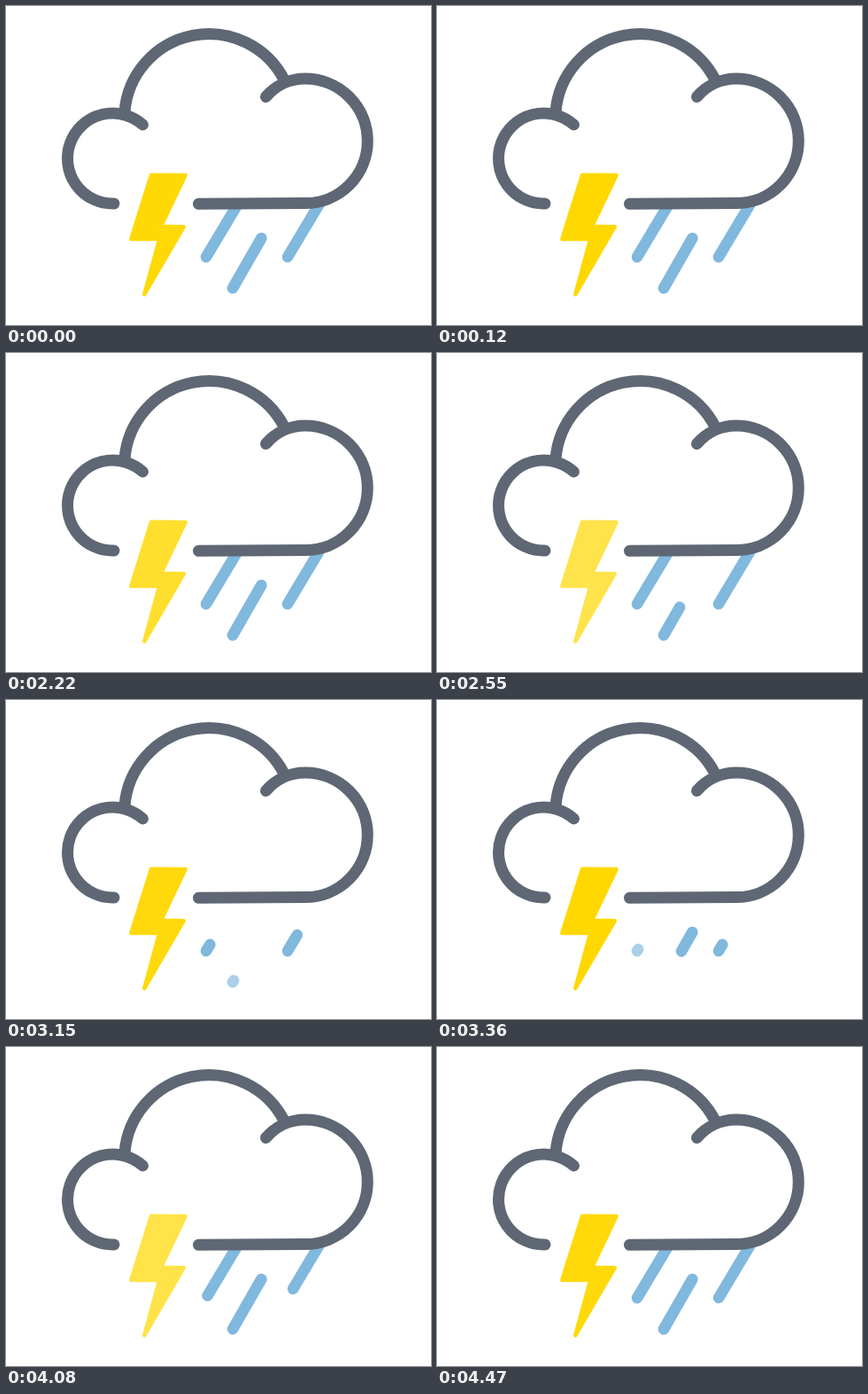
Write an HTML page that moves like this. It is 480x360 px and loops after 4500 ms.

```html
<!DOCTYPE html>
<html lang="en">
<head>
<meta charset="utf-8">
<title>Thunderstorm</title>
<style>
  html, body { margin: 0; width: 100%; height: 100%; overflow: hidden; background: #fff; }
  svg { display: block; width: 100vw; height: 100vh; }
  path { stroke-linecap: round; stroke-linejoin: round; }
  .cloud { fill: none; stroke: #5e6773; stroke-width: 13; }
  #rain { stroke: #80b8de; stroke-width: 12.6; }
  #bolt { fill: #ffd800; stroke: #ffd800; stroke-width: 4.5; }
</style>
</head>
<body>
<svg viewBox="0 0 480 360">
  <g id="rain"></g>
  <path class="cloud" d="M122 223A51 51 0 1 1 154.5 134"/>
  <path class="cloud" style="stroke-linecap:butt" d="M134 120A95.5 95.5 0 0 1 314.5 84"/>
  <path class="cloud" d="M293.5 102.5A58.5 58.5 0 0 1 338 82A70.3 70.3 0 0 1 338 222.6L217.5 223.3"/>
  <path id="bolt" d="M164 190.8L202.6 191L175 248.8L200.8 249.2L156.3 325.3L173.2 263L141.3 263Z"/>
</svg>
<script>
const LOOP = 4500;
const bolt = document.getElementById('bolt');
const rain = document.getElementById('rain');

const clamp = x => Math.max(0, Math.min(1, x));
const easeOut = x => 1 - (1 - clamp(x)) ** 3;
const dip = x => x > 0 && x < 1 ? (1 - Math.cos(2 * Math.PI * x)) / 2 : 0;

// Each drop: top, bottom, and the time it starts to drain
const drops = [
  [261.5, 224, 226, 283.3, 2550],
  [288.4, 262, 256, 318.5, 2340],
  [353.5, 224, 318, 283.3, 2760]
].map(([x1, y1, x2, y2, start]) => {
  const path = document.createElementNS('http://www.w3.org/2000/svg', 'path');
  rain.append(path);
  return { path, x1, y1, x2, y2, start };
});

function drawDrop(d, t) {
  const age = (t - d.start + LOOP) % LOOP;
  const refill = age - 870;
  const draining = refill < 0;
  const from = draining ? easeOut(age / 1200) : 0;
  const to = draining ? 1 : easeOut(refill / 1020);
  const point = k => `${d.x1 + (d.x2 - d.x1) * k} ${d.y1 + (d.y2 - d.y1) * k}`;
  d.path.setAttribute('d', `M${point(from)}L${point(to)}`);
  d.path.setAttribute('opacity', draining ? clamp(-refill / 90) : clamp(refill / 90));
}

function draw(now) {
  const t = now % LOOP;
  const flashTime = t < 1000 ? t + LOOP : t;
  const fade = dip((flashTime - 1770) / 1590) + dip((flashTime - 3360) / 1260);
  bolt.setAttribute('opacity', 1 - 0.3 * fade);
  drops.forEach(d => drawDrop(d, t));
}

const begin = performance.now();
function tick() {
  draw(performance.now() - begin);
  requestAnimationFrame(tick);
}
tick();
</script>
</body>
</html>
```
